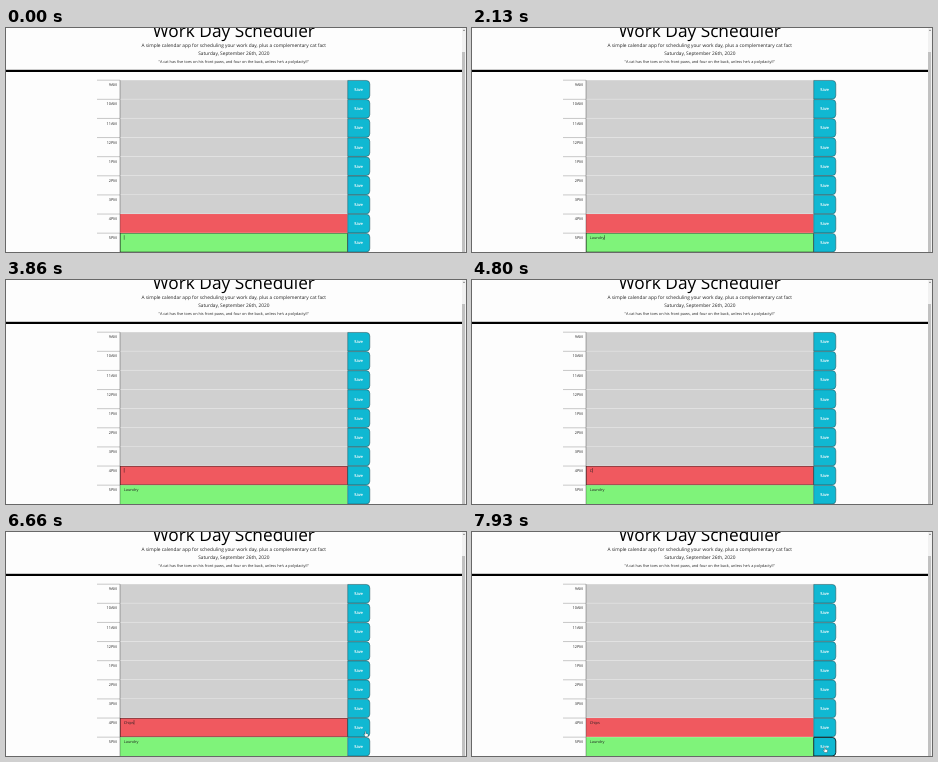
Recreate the animation shown at these times as an HTML page. Size 460 by 224 pixels, loop 8000 ms.

```html
<!DOCTYPE html>
<html lang="en">
<head>
<meta charset="utf-8">
<title>Work Day Scheduler</title>
<style>
  html, body { margin: 0; width: 100%; height: 100%; overflow: hidden; background: #fdfdfd; }
  svg { display: block; width: 460px; height: 224px; }
  text { font: 3.83px "Open Sans", "Noto Sans", sans-serif; fill: #222; text-rendering: geometricPrecision; }
  .head text { text-anchor: middle; fill: #222; }
  .head .title { font-size: 17.25px; fill: #000; }
  .head .lead { font-size: 4.79px; }
  .hour { text-anchor: end; }
  .save { text-anchor: middle; font-size: 4px; fill: #fff; stroke: #fff; stroke-width: .1; }
  .past { fill: #d0d0d0; }
  .present { fill: #f0595f; }
  .future { fill: #7ff37a; }
  .button { fill: #10b8d2; stroke: #24464d; stroke-width: .5; }
  .button.focus { stroke: #000; stroke-width: .8; }
  .ring { fill: none; stroke: #111; stroke-opacity: .8; stroke-width: .5; }
</style>
</head>
<body>
<svg viewBox="0 0 460 224">
  <g class="head">
    <text class="title" x="227.8" y="9.4">Work Day Scheduler</text>
    <text class="lead" x="227.8" y="18.5">A simple calendar app for scheduling your work day, plus a complementary cat fact</text>
    <text class="lead" x="227.8" y="27.3">Saturday, September 26th, 2020</text>
    <text x="227.8" y="35.2">"A cat has five toes on his front paws, and four on the back, unless he's a polydactyl!"</text>
  </g>
  <rect y="41.8" width="456" height="2.2"/>
  <rect x="456" width="4" height="224" fill="#f1f1f1"/>
  <rect x="456" width="3" y="24" height="200" fill="#c1c1c1"/>
  <path d="M457 2.8l1-1.2 1 1.2z" fill="#505050"/>
  <g id="rows"></g>
  <rect id="ring" class="ring" x="114.2" width="227.1" height="18.6"/>
  <text id="early" x="117.8"></text>
  <text id="late" x="117.8"></text>
  <rect id="caret" width=".4" height="4.6" fill="#111"/>
  <path id="hand" fill="#fff" stroke="#111" stroke-width=".3" stroke-linejoin="round"
    d="M0 0q.5-.5.9 0v1.8l1.9.5q.5.2.4.8l-.4 2H.3L-1.2 3q0-.7.6-.5l.6.6z"/>
</svg>
<script>
const LOOP = 8000, TOP = 52.2, PITCH = 19.12;
const $ = id => document.getElementById(id);
const rowY = i => TOP + i * PITCH;

const hours = ['9AM', '10AM', '11AM', '12PM', '1PM', '2PM', '3PM', '4PM', '5PM'];
$('rows').innerHTML = hours.map((hour, i) => {
  const y = rowY(i), kind = i < 7 ? 'past' : i === 7 ? 'present' : 'future';
  return `<path d="M91 ${y}H114" stroke="#777" stroke-width=".4"/>
    <text class="hour" x="110.8" y="${y + 6.1}">${hour}</text>
    <rect class="${kind}" x="114" y="${y}" width="227.5" height="${PITCH}"/>
    <path d="M114 ${y + PITCH}H341.5" stroke="#fff" stroke-width=".4"/>
    <path d="M114 ${y}v${PITCH}" stroke="#333" stroke-width=".4"/>
    <path class="button" d="M341.7 ${y + .25}h18.5a3.6 3.6 0 0 1 3.6 3.6v11.4a3.6 3.6 0 0 1-3.6 3.6h-18.5z"/>
    <text class="save" x="352.6" y="${y + 11}">Save</text>`;
}).join('');
const buttons = document.querySelectorAll('.button');

const fields = [
  { el: $('late'), row: 8, word: 'Laundry', keys: [1200, 1400, 1530, 1660, 1860, 2000, 2130], from: 0, to: 3730 },
  { el: $('early'), row: 7, word: 'Chips', keys: [4800, 4860, 5000, 5130, 5330], from: 3730, to: 6860 }
];
const caretOff = [[800, 1200], [2660, 3200], [4260, 4800], [5860, 6400]];

// time, x, y of the pointer tip
const moves = [
  [6530, 347, 198], [6600, 354, 199], [6660, 359, 199.6], [6730, 358, 199],
  [6800, 356, 198], [6860, 355, 198], [7130, 355, 201], [7200, 354, 206],
  [7260, 353, 211], [7400, 352.6, 214], [7460, 352.4, 215.4]
];

fields.forEach(f => f.el.setAttribute('y', rowY(f.row) + 5.8));

function draw(t) {
  for (const f of fields) {
    const typed = f.word.slice(0, f.keys.filter(k => t >= k).length);
    if (f.el.textContent !== typed) f.el.textContent = typed;
  }

  const active = fields.find(f => t >= f.from && t < f.to);
  const blank = caretOff.some(([a, b]) => t >= a && t < b);
  $('ring').style.display = active ? '' : 'none';
  $('caret').style.display = active && !blank ? '' : 'none';
  if (active) {
    const y = rowY(active.row);
    const width = active.el.textContent ? active.el.getComputedTextLength() : 0;
    $('ring').setAttribute('y', y + .2);
    $('caret').setAttribute('x', 117.9 + width);
    $('caret').setAttribute('y', y + 2);
  }

  buttons[7].classList.toggle('focus', t >= 6860 && t < 7930);
  buttons[8].classList.toggle('focus', t >= 7930);

  const spot = moves.filter(m => t >= m[0]).pop();
  $('hand').style.display = spot ? '' : 'none';
  if (spot) $('hand').setAttribute('transform', `translate(${spot[1]} ${spot[2]})`);
}

const start = performance.now();
function tick() {
  draw((performance.now() - start) % LOOP);
  requestAnimationFrame(tick);
}
tick();
</script>
</body>
</html>
```
